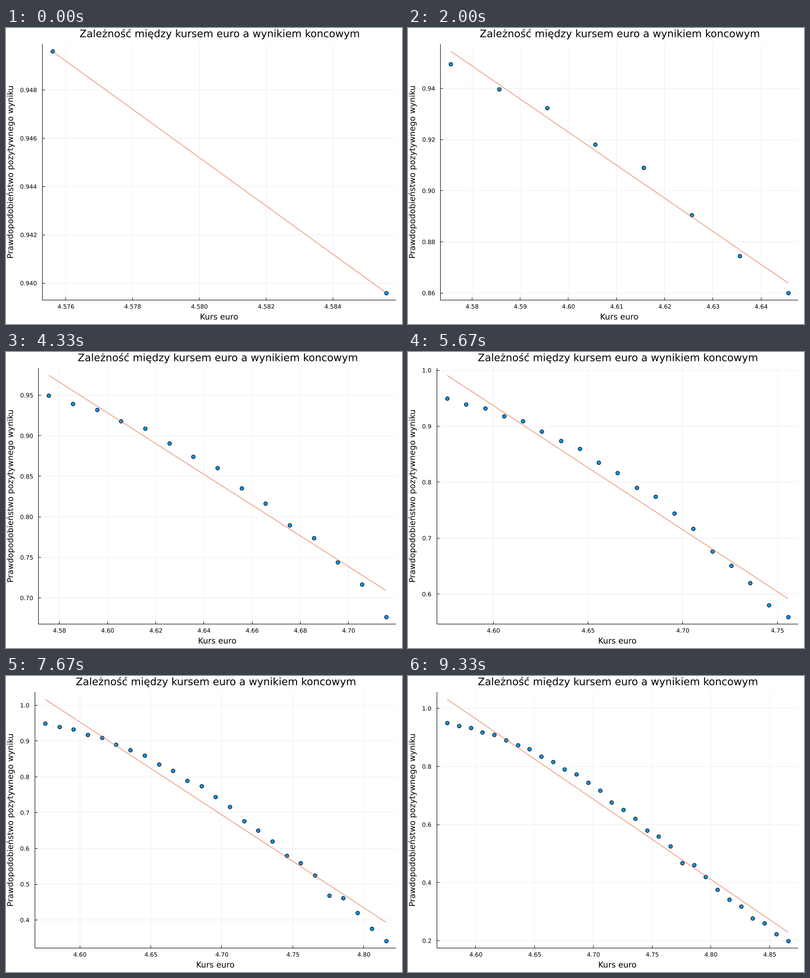
Animation, 800 px wide and 600 px high, one loop 9.66 s. Source, as a matplotlib script:

```python
import math

import matplotlib.pyplot as plt
import numpy as np
from matplotlib.animation import FuncAnimation
from matplotlib.collections import LineCollection
from matplotlib.patches import PathPatch
from matplotlib.path import Path
from matplotlib.textpath import TextPath
from matplotlib.transforms import Affine2D

plt.rcParams["font.family"] = "DejaVu Sans"

W, H, DPI = 800, 600, 100
PX = 72 / DPI                      # points per pixel
TICK_MS, LOOP_MS = 30, 9660
TOP, BOTTOM, RIGHT = 32.6, 551.3, 788.2
TITLE_SIZE, LABEL_SIZE, TICK_SIZE = 20.8, 16.35, 11.89
BLUE, ORANGE = "#009afa", "#e26f46"

PROB = np.array([
    0.9496, 0.9396, 0.9323, 0.9181, 0.9090, 0.8905, 0.8744, 0.8601, 0.8351, 0.8166,
    0.7898, 0.7739, 0.7441, 0.7170, 0.6768, 0.6508, 0.6199, 0.5805, 0.5595, 0.5245,
    0.4683, 0.4614, 0.4203, 0.3759, 0.3421, 0.3183, 0.2770, 0.2598, 0.2224, 0.1998,
])
RATE = 4.5756 + 0.01 * np.arange(len(PROB))
SCENES = len(PROB) - 1


def widen(values):
    """Data limits with a 3 % margin on both sides."""
    lo, hi = values.min(), values.max()
    pad = 0.03 * (hi - lo)
    return lo - pad, hi + pad


def nice_ticks(lo, hi):
    """Ticks with the best mix of count, coverage and round step."""
    niceness = {5: 0.9, 3: 0.2, 2.5: 0.5, 2: 0.7, 1: 1.0}
    span = hi - lo
    top = math.ceil(math.log10(span))
    best, best_score = None, -math.inf
    for power in range(top, top - 4, -1):
        for q, nice in niceness.items():
            step = q * 10.0 ** power
            ticks = np.arange(math.ceil(lo / step), math.floor(hi / step) + 1) * step
            n = len(ticks)
            if not 4 <= n <= 8:
                continue
            count = 1 - abs(n - 5) / 5
            cover = 1.5 * span / ((n - 1) * step)
            score = count / 4 + cover / 3 + nice / 4
            if score > best_score + 1e-9:
                best, best_score = ticks, score
    return best


def tick_labels(ticks):
    digits = 0
    while np.abs(ticks - np.round(ticks, digits)).max() > 1e-8:
        digits += 1
    return [f"{t:.{digits}f}" for t in ticks]


def text(s, x, y, size, align="center", angle=0):
    """Outline of a string with its baseline at y, in stage pixels."""
    path = TextPath((0, 0), s, size=size)
    box = path.get_extents()
    anchor = box.x1 if align == "right" else (box.x0 + box.x1) / 2
    move = Affine2D().translate(-anchor, 0).scale(1, -1).rotate_deg(-angle)
    return move.translate(x, y).transform_path(path)


def crisp(v):
    return math.floor(v) + 0.5


def segments(ax, lines, width, color, alpha, z):
    return ax.add_collection(LineCollection(
        lines, linewidths=width * PX, colors=color, alpha=alpha,
        zorder=z, snap=False, capstyle="butt"))


def build_scene(ax, count):
    """All artists of the chart with the first count points."""
    x, y = RATE[:count], PROB[:count]
    slope, mid = np.polyfit(x - x.mean(), y, 1)
    fit = mid + slope * (x - x.mean())

    xlim, ylim = widen(x), widen(np.concatenate([y, fit]))
    xticks, yticks = nice_ticks(*xlim), nice_ticks(*ylim)
    xnames, ynames = tick_labels(xticks), tick_labels(yticks)
    left = 39.5 + TICK_SIZE * (0.636 * (len(ynames[0]) - 1) + 0.318)

    def px(v):
        return left + (v - xlim[0]) / (xlim[1] - xlim[0]) * (RIGHT - left)

    def py(v):
        return BOTTOM - (v - ylim[0]) / (ylim[1] - ylim[0]) * (BOTTOM - TOP)

    axis_x, axis_y = crisp(left), crisp(BOTTOM)
    center = (left + RIGHT) / 2
    grid = []
    frame = [[(axis_x, TOP), (axis_x, axis_y + 0.5)],
             [(axis_x - 0.5, axis_y), (RIGHT, axis_y)]]
    words = [
        text("Zależność między kursem euro a wynikiem koncowym",
             center + 0.4, 18.6, TITLE_SIZE),
        text("Kurs euro", center, 590.9, LABEL_SIZE),
        text("Prawdopodobieństwo pozytywnego wyniku",
             14.2, (TOP + BOTTOM) / 2, LABEL_SIZE, angle=90),
    ]
    for v, name in zip(xticks, xnames):
        p = px(v)
        c = crisp(p)
        grid.append([(c, TOP), (c, BOTTOM)])
        frame.append([(c, axis_y), (c, axis_y - 5.2)])
        words.append(text(name, p + 0.2, 568.8, TICK_SIZE))
    for v, name in zip(yticks, ynames):
        p = py(v)
        c = crisp(p)
        grid.append([(left, c), (RIGHT, c)])
        frame.append([(axis_x, c), (axis_x + 5.2, c)])
        words.append(text(name, left - 11.9, p + 4.5, TICK_SIZE, "right"))

    dots = ax.scatter(px(x), py(y), s=(7.4 * PX) ** 2, c=BLUE,
                      edgecolors="black", linewidths=1.1 * PX, zorder=2)
    trend = [[(px(x[0]), py(fit[0])), (px(x[-1]), py(fit[-1]))]]
    letters = PathPatch(Path.make_compound_path(*words),
                        fc="black", lw=0, zorder=5, snap=False)
    return [
        segments(ax, grid, 0.7, "black", 0.1, 0),
        dots,
        segments(ax, trend, 1, ORANGE, 1, 3),
        segments(ax, frame, 1, "black", 1, 4),
        ax.add_patch(letters),
    ]


fig = plt.figure(figsize=(W / DPI, H / DPI), dpi=DPI, facecolor="white")
ax = fig.add_axes([0, 0, 1, 1])
ax.set(xlim=(0, W), ylim=(H, 0))
ax.axis("off")
scenes = [build_scene(ax, n + 2) for n in range(SCENES)]


def update(tick):
    # three scenes per second, rounded to the tick
    now = min(SCENES - 1, int((tick * TICK_MS + 25) * 3 / 1000))
    for n, scene in enumerate(scenes):
        for artist in scene:
            artist.set_visible(n == now)
    return scenes[now]


anim = FuncAnimation(fig, update, frames=LOOP_MS // TICK_MS, interval=TICK_MS,
                     init_func=lambda: update(0), repeat=True, repeat_delay=0)
plt.show()
```
